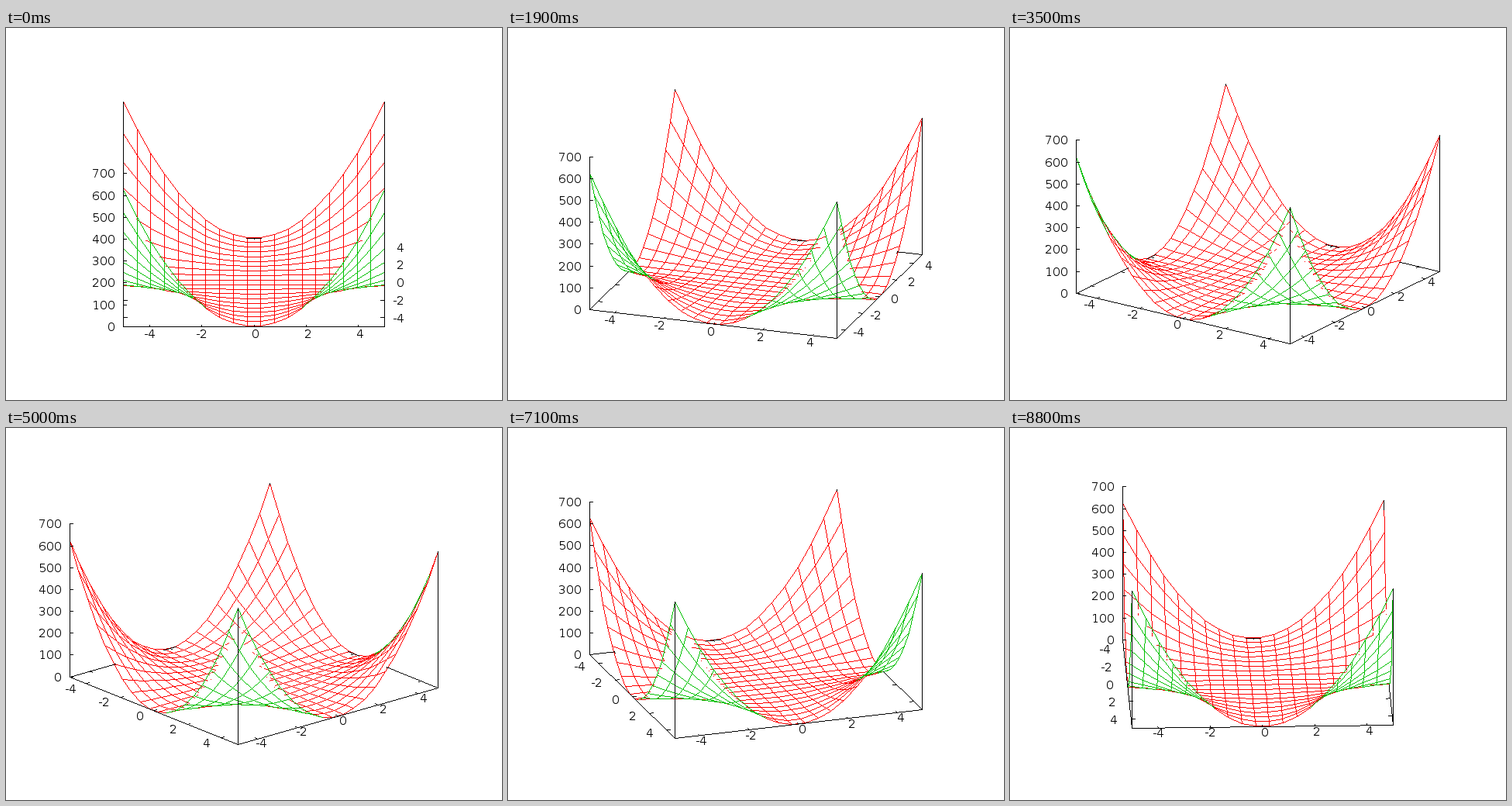
Animation of 640 by 480 pixels, one loop 8.9 s. Source, as a matplotlib script:

```python
import numpy as np
import matplotlib.pyplot as plt
from matplotlib.animation import FuncAnimation

plt.rcParams["text.hinting"] = "native"
plt.rcParams["text.hinting_factor"] = 1

W, H, DPI = 640, 480, 80
FRAMES, INTERVAL = 89, 100
PX = 72 / DPI                       # one pixel in points
RED, GREEN, BLACK = (255, 0, 0), (0, 192, 0), (0, 0, 0)

# Orthographic view tilted by 60 degrees
CX, CY = 320, 328.2
RX, RY = 168.7, 57.0                # half base width and depth in pixels
ZH, ZMAX = 197.3, 700               # z axis height in pixels, top value
TIC = 5

LIM, N = 5, 20
CORNER = LIM**4
TICKS = range(-4, 5, 2)
ZTICKS = range(0, ZMAX + 1, 100)

# Sight line: height gained per unit of depth, and where to probe along it
RISE = RY / LIM * ZMAX / ZH
STEPS = 3 * LIM * np.linspace(0.02, 1, 64) ** 2
TOL = 2


def surface(x, y):
    return x * x * y * y


def project(p, c, s):
    x, y, z = np.moveaxis(np.asarray(p, float), -1, 0)
    px = CX + RX * (x * c + y * s) / LIM
    py = CY - RY * (y * c - x * s) / LIM - ZH * z / ZMAX
    return np.stack([px, py], axis=-1)


def visible(p, c, s):
    """False where the sight line crosses the surface."""
    x0, y0, z0 = p.T
    below = np.zeros(len(p), bool)
    above = np.zeros(len(p), bool)
    edge = LIM - 0.005
    for t in STEPS:
        x, y = x0 + s * t, y0 - c * t
        inside = (np.abs(x) < edge) & (np.abs(y) < edge)
        gap = surface(x, y) - z0 - RISE * t
        below |= inside & (gap > TOL)
        above |= inside & (gap < -TOL)
    return ~(below & above)


def trace(a, b, c, s):
    """Visible pixels of straight segments, and the segment of each."""
    pa = np.floor(project(a, c, s))
    pb = np.floor(project(b, c, s))
    n = np.maximum(np.abs(pb - pa).max(axis=1), 1)
    k = np.arange(n.max() + 1)
    seg, step = np.nonzero(k <= n[:, None])
    t = (step / n[seg])[:, None]
    pix = np.floor(pa[seg] + (pb - pa)[seg] * t + 0.5).astype(int)
    ok = visible(a[seg] + (b - a)[seg] * t, c, s)
    return pix[ok], seg[ok]


def mesh_edges():
    g = np.linspace(-LIM, LIM, N)
    x, y = np.meshgrid(g, g)
    p = np.stack([x, y, surface(x, y)], axis=-1)
    a = np.concatenate([p[:, :-1].reshape(-1, 3), p[:-1].reshape(-1, 3)])
    b = np.concatenate([p[:, 1:].reshape(-1, 3), p[1:].reshape(-1, 3)])
    return a, b


def frame_edges():
    L, k = LIM, TIC * LIM / RX
    lines = [((-L, -L, 0), (L, -L, 0)), ((L, -L, 0), (L, L, 0)),
             ((L, L, 0), (-L, L, 0)), ((-L, L, 0), (-L, -L, 0)),
             ((-L, -L, 0), (-L, -L, ZMAX))]
    lines += [((x, y, 0), (x, y, CORNER))
              for x, y in ((L, -L), (L, L), (-L, L))]
    for v in TICKS:
        for e in (-L, L):
            inner = e - np.sign(e) * k
            lines += [((v, e, 0), (v, inner, 0)), ((e, v, 0), (inner, v, 0))]
    return np.array(lines, float).transpose(1, 0, 2)


MESH = mesh_edges()
FRAME = frame_edges()
MID_X, MID_Y = ((MESH[0] + MESH[1]) / 2)[:, :2].T

fig = plt.figure(figsize=(W / DPI, H / DPI), dpi=DPI, facecolor="white")
ax = fig.add_axes([0, 0, 1, 1])
ax.axis("off")
canvas = np.full((H, W, 3), 255, np.uint8)
picture = ax.imshow(canvas, extent=(0, W, H, 0), aspect="auto",
                    interpolation="nearest")


def make_label(text, ha="center"):
    return ax.text(0, 0, text, ha=ha, va="baseline",
                   family="DejaVu Sans", size=15 * PX, color="black")


x_labels = [make_label(f"{v: d}") for v in TICKS]
y_labels = [make_label(f"{v: d}") for v in TICKS]
z_labels = [make_label(str(v), "right") for v in ZTICKS]


def place(label, x, y, ha):
    label.set_position((x, y + 6))
    label.set_ha(ha)


def plot(pix, color):
    canvas[pix[:, 1], pix[:, 0]] = color


def draw(i):
    a = np.radians(i)
    c, s = np.cos(a), np.sin(a)
    canvas[:] = 255

    # An edge shows its underside where the surface climbs past the sight line
    under = 2 * MID_X * MID_Y * (MID_Y * s - MID_X * c) > RISE
    pix, seg = trace(*MESH, c, s)
    plot(pix[~under[seg]], RED)
    plot(pix[under[seg]], GREEN)
    plot(trace(*FRAME, c, s)[0], BLACK)

    for v, label in zip(ZTICKS, z_labels):
        x, y = np.floor(project((-LIM, -LIM, v), c, s)).astype(int)
        canvas[y, x:x + TIC] = BLACK
        place(label, x - 10, y, "right")
    for v, label in zip(TICKS, x_labels):
        x, y = project((v, -LIM, 0), c, s)
        place(label, x - 17 * s, y + 9 * c, "right" if i > 42 else "center")
    for v, label in zip(TICKS, y_labels):
        x, y = project((LIM, v, 0), c, s)
        if i < 27:
            place(label, x + 10.5 * c, y + 6.5 * s, "left")
        else:
            place(label, x + 7 * c, y + 6.5 * s, "center")

    picture.set_data(canvas)
    return [picture, *x_labels, *y_labels, *z_labels]


anim = FuncAnimation(fig, draw, frames=FRAMES, interval=INTERVAL,
                     repeat=True, repeat_delay=0)
plt.show()
```
